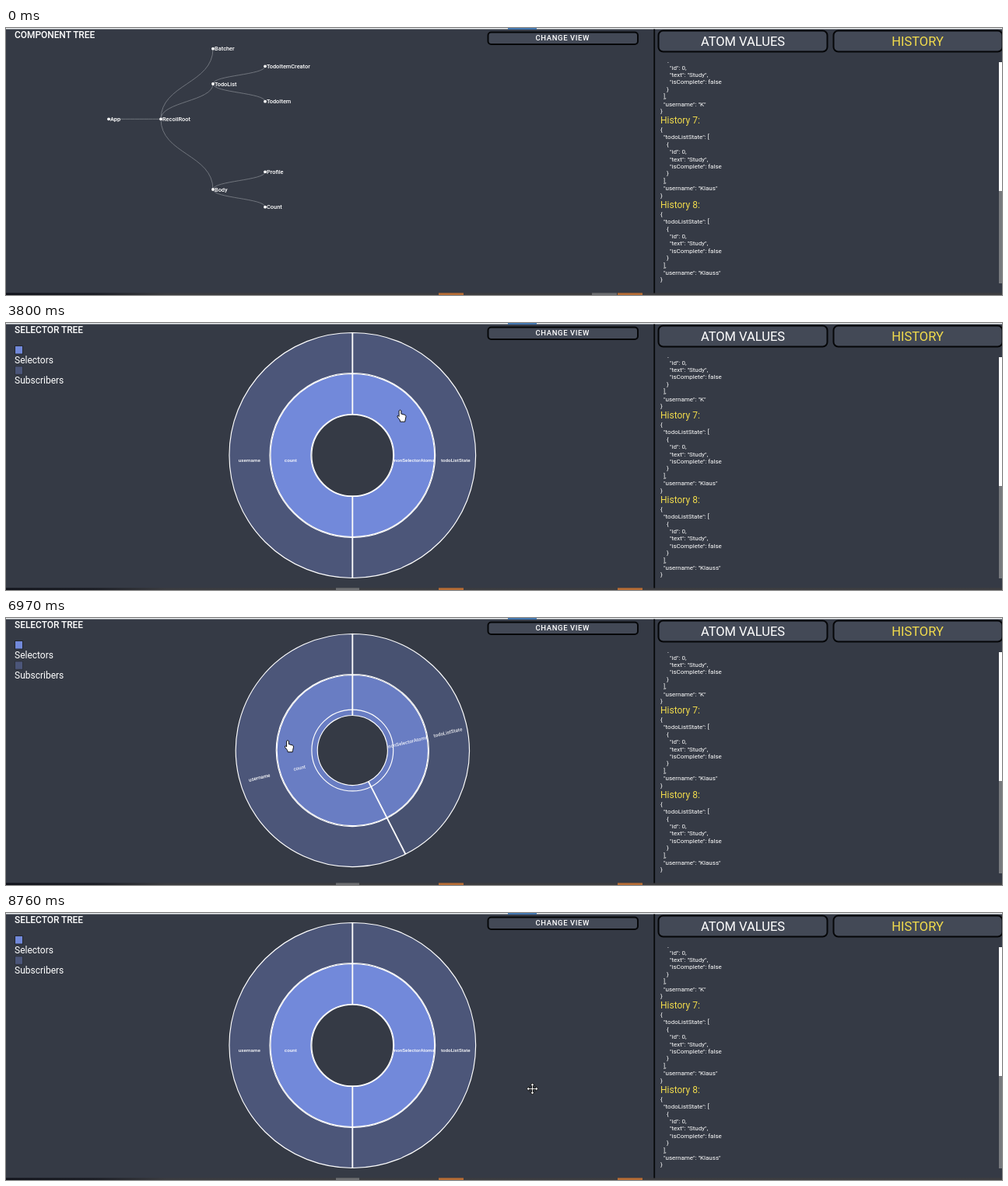
These frames come from a looping animation (1280 by 344 pixels, 8.81 s). An HTML page:

```html
<!DOCTYPE html>
<html lang="en">
<head>
<meta charset="utf-8">
<title>State inspector</title>
<style>
html, body { margin: 0; width: 100%; height: 100%; overflow: hidden; background: #353a45; }
svg { display: block; font-family: Roboto, sans-serif; fill: #fff; }
.title { font-size: 11.9px; font-weight: 500; }
.legend { font-size: 12px; }
.tab { font-size: 16.5px; text-anchor: middle; }
.view { font-size: 9.5px; font-weight: 500; letter-spacing: .6px; text-anchor: middle; }
.code { font-size: 8px; white-space: pre; }
.head { font-size: 12px; }
.yellow { fill: #f2dc4c; }
.box { fill: #434956; stroke: #050608; stroke-width: 2; }
.node { font-size: 7.4px; font-weight: 500; }
.link { fill: none; stroke: #777b83; stroke-width: .9; }
.arc { stroke: #fff; stroke-width: 1.15; }
.label { font-size: 6.25px; font-weight: 500; text-anchor: middle; }
.cursor { fill: #fff; stroke: #000; stroke-width: .9; stroke-linejoin: round; }
</style>
</head>
<body>
<svg id="stage" width="1280" height="344" viewBox="0 0 1280 344">
  <defs>
    <linearGradient id="bar">
      <stop offset="0" stop-color="#11131b"/>
      <stop offset=".09" stop-color="#1b1d24"/>
      <stop offset=".16" stop-color="#3a3b3f"/>
      <stop offset="1" stop-color="#3d3d40"/>
    </linearGradient>
    <clipPath id="list"><rect x="835" y="44" width="440" height="297"/></clipPath>
  </defs>
  <rect width="1280" height="344" fill="#353a45"/>
  <rect width="1280" height="1.5" fill="#eef0f2"/>
  <rect x="645" width="37" height="2" fill="#4377b0"/>
  <rect y="341.3" width="1280" height="2.7" fill="url(#bar)"/>
  <g fill="#b66c35">
    <rect x="556" y="341.3" width="32" height="2.7"/>
    <rect x="786" y="341.3" width="32" height="2.7"/>
  </g>
  <rect id="task" y="341.3" height="2.7" fill="#6c6d70"/>

  <rect x="832.3" y="1.5" width="1.8" height="340" fill="#08090b"/>
  <rect class="box" x="619.5" y="5.5" width="192.5" height="15.5" rx="4"/>
  <text class="view" x="715.3" y="16.3">CHANGE VIEW</text>
  <rect class="box" x="838.5" y="3.5" width="217" height="27" rx="6"/>
  <text class="tab" x="947" y="23">ATOM VALUES</text>
  <rect class="box" x="1063.5" y="3.5" width="217" height="27" rx="6"/>
  <text class="tab yellow" x="1171.5" y="23">HISTORY</text>
  <rect x="1276" y="44" width="4" height="166" fill="#fff"/>
  <rect x="1276" y="210" width="4" height="119" fill="#77797d"/>
  <g id="history" clip-path="url(#list)"></g>

  <g id="tree"><text class="title" x="11" y="13">COMPONENT TREE</text></g>
  <g id="selectors">
    <text class="title" x="11" y="13">SELECTOR TREE</text>
    <rect x="11.5" y="29.5" width="10" height="10.5" fill="#7289da" stroke="#23262e"/>
    <text class="legend" x="11" y="51.5">Selectors</text>
    <rect x="11.5" y="55.8" width="10" height="10.5" fill="#4c5679" stroke="#2d313b"/>
    <text class="legend" x="11" y="77.7">Subscribers</text>
    <g id="sun" transform="translate(445.3 170.5)"></g>
  </g>

  <circle id="click" r="8" fill="#ffff00" fill-opacity=".45"/>
  <g id="cursor" class="cursor">
    <path id="arrow" d="M0 0V15L3.5 11.8L5.8 17L8 16L5.8 11H10.5Z"/>
    <path id="move" d="M0-7.5L2.9-4.3H.9V-.9H4.3V-2.9L7.5 0L4.3 2.9V.9H.9V4.3H2.9L0 7.5L-2.9 4.3H-.9V.9H-4.3V2.9L-7.5 0L-4.3-2.9V-.9H-.9V-4.3H-2.9Z"/>
    <path id="hand" d="M-1.4 1Q0-.7 1.4 1V5L6.2 6.4Q7.7 6.9 7.5 8.7L6.6 13L6.2 15.2H.2L-.3 13L-3.5 9Q-3.9 7.3-2.5 7.4L-1.4 8.5Z"/>
  </g>
</svg>
<script>
const LOOP = 8810, SWITCH = 1250, R = 53, ZOOM = 750;
const $ = id => document.getElementById(id);
const lerp = (a, b, f) => a + (b - a) * f;
const clamp = v => Math.max(0, Math.min(1, v));

function add(parent, tag, attrs, text) {
  const el = document.createElementNS('http://www.w3.org/2000/svg', tag);
  for (const k in attrs) el.setAttribute(k, attrs[k]);
  if (text) el.textContent = text;
  return parent.appendChild(el);
}

// History list
['K', 'Klaus', 'Klauss'].forEach((username, i) => {
  const top = 25.4 + 108.7 * i;
  const state = { todoListState: [{ id: 0, text: 'Study', isComplete: false }], username };
  add($('history'), 'text', { class: 'head yellow', x: 841, y: top - 10.9 }, `History ${6 + i}:`);
  JSON.stringify(state, null, 2).split('\n').forEach((line, k) =>
    add($('history'), 'text', { class: 'code', x: 841, y: top + 9.39 * k }, line));
});

// Component tree: name, x, y, parent index
const parts = [
  ['App', 132, 117.3], ['RecoilRoot', 199, 117.3, 0], ['Batcher', 266, 26.7, 1],
  ['TodoList', 266, 72, 1], ['Body', 266, 208, 1], ['TodoItemCreator', 333, 49.3, 3],
  ['TodoItem', 333, 94.7, 3], ['Profile', 333, 185.3, 4], ['Count', 333, 230.7, 4]
];
for (const [, x, y, p] of parts) {
  if (p === undefined) continue;
  const [, px, py] = parts[p], mid = (y + py) / 2;
  add($('tree'), 'path', { class: 'link', d: `M${px} ${py}C${px} ${mid} ${x} ${mid} ${x} ${y}` });
}
for (const [name, x, y] of parts) {
  add($('tree'), 'circle', { cx: x, cy: y, r: 1.9 });
  add($('tree'), 'text', { class: 'node', x: x + 2, y: y + 2.5 }, name);
}

// Sunburst: side 0 is the right half, side 1 the left half
const slices = [['nonSelectorAtoms', 0, 1], ['count', 1, 1], ['todoListState', 0, 2], ['username', 1, 2]]
  .map(([name, side, depth]) => ({ name, side, depth }));
for (const s of slices)
  s.path = add($('sun'), 'path', { class: 'arc', fill: s.depth === 1 ? '#7289da' : '#4c5679' });
add($('sun'), 'circle', { class: 'arc', r: R - .6, fill: 'none' });
for (const s of slices) s.label = add($('sun'), 'text', { class: 'label', y: 8.3 }, s.name);

const at = (r, a) => `${(r * Math.sin(a)).toFixed(2)} ${(-r * Math.cos(a)).toFixed(2)}`;

function ring(r) {
  return r < .01 ? '' : `M0 ${-r}A${r} ${r} 0 1 1 0 ${r}A${r} ${r} 0 1 1 0 ${-r}Z`;
}

function sector(x0, x1, r0, r1) {
  if (x1 - x0 > .99999) return ring(r1) + ring(r0);
  const a0 = x0 * 2 * Math.PI, a1 = x1 * 2 * Math.PI;
  const gap = r => r > 1 ? Math.min(.35 / r, (a1 - a0) / 2) : 0;
  const big = x1 - x0 > .5 ? 1 : 0, g0 = gap(r0), g1 = gap(r1);
  return `M${at(r1, a0 + g1)}A${r1} ${r1} 0 ${big} 1 ${at(r1, a1 - g1)}` +
    `L${at(r0, a1 - g0)}A${r0} ${r0} 0 ${big} 0 ${at(r0, a0 + g0)}Z`;
}

function drawSun(f, open) {
  for (const s of slices) {
    const edge = x => lerp(x, clamp(x * 2 - open), f);
    const x0 = edge(s.side / 2), x1 = edge((s.side + 1) / 2);
    const y = s.depth - f, stays = s.depth === 2 && s.side === open;
    const turn = (x0 + x1) * 180;
    s.path.setAttribute('d', sector(x0, x1, y * R, (y + 1) * R - 1));
    s.path.setAttribute('fill-opacity', stays ? 1 : 1 - f);
    s.path.setAttribute('fill-rule', 'evenodd');
    s.label.setAttribute('fill-opacity', stays ? 1 : 1 - f);
    s.label.setAttribute('transform',
      `rotate(${turn - 90}) translate(${(y + .5) * R} 0) rotate(${turn < 180 ? 0 : 180})`);
  }
}

function ease(t, start) {
  const u = clamp((t - start) / ZOOM);
  return u < .5 ? 4 * u ** 3 : 1 - 4 * (1 - u) ** 3;
}

// Pointer: time, x, y, shape from that time on
const moves = [
  [130, 1131, 312, 'arrow'], [600, 860, 110, 'arrow'], [700, 815, 75, 'move'], [980, 722, 33, 'move'],
  [1080, 716, 15, 'hand'], [1300, 716, 15, 'hand'], [1400, 690, 26, 'move'], [1910, 335, 81, 'move'],
  [2100, 288.5, 93.5, 'move'], [2300, 245, 108, 'move'], [2480, 310, 128, 'move'], [2770, 484, 140, 'move'],
  [2930, 484, 140, 'move'], [3100, 454, 158, 'move'], [3220, 454, 158, 'move'],
  [3340, 494, 123, 'hand'], [3390, 506.5, 112, 'hand'], [3900, 506.5, 112, 'hand'],
  [4050, 570, 125, 'move'], [4250, 630, 138, 'move'], [4400, 610, 142, 'move'], [4700, 458, 147, 'move'],
  [4900, 458, 147, 'move'], [5060, 451, 162, 'move'], [5850, 451, 162, 'move'],
  [5960, 390, 156, 'hand'], [6150, 339, 148, 'hand'], [6260, 339, 148, 'hand'], [6480, 362, 157.5, 'hand'],
  [7440, 362, 157.5, 'hand'], [7510, 400, 162, 'move'], [7640, 470.5, 167.5, 'move'],
  [8150, 470.5, 167.5, 'move'], [8740, 676.5, 226.5, 'move'], [LOOP, 676.5, 226.5, 'move']
];
const clicks = [[1150, SWITCH], [3660, 3800], [5000, 5090], [6620, 6760], [7690, 7960]];

function drawCursor(t) {
  const shown = t >= moves[0][0];
  $('cursor').style.display = shown ? '' : 'none';
  const pressed = clicks.some(([from, to]) => t >= from && t < to);
  $('click').style.display = pressed ? '' : 'none';
  if (!shown) return;
  const i = moves.findIndex(m => m[0] > t);
  const [t0, x0, y0, shape] = moves[i - 1], [t1, x1, y1] = moves[i];
  const f = (t - t0) / (t1 - t0);
  const place = `translate(${lerp(x0, x1, f)} ${lerp(y0, y1, f)})`;
  $('cursor').setAttribute('transform', place);
  $('click').setAttribute('transform', place);
  for (const id of ['arrow', 'move', 'hand']) $(id).style.display = id === shape ? '' : 'none';
}

function frame() {
  const t = performance.now() % LOOP, second = t >= SWITCH;
  $('tree').style.display = second ? 'none' : '';
  $('selectors').style.display = second ? '' : 'none';
  $('task').setAttribute('x', second ? 424 : 753);
  $('task').setAttribute('width', second ? 30 : 32);
  const open = t < 6300 ? 0 : 1;
  drawSun(open ? ease(t, 6720) - ease(t, 7940) : ease(t, 3790) - ease(t, 5090), open);
  drawCursor(t);
  requestAnimationFrame(frame);
}
frame();
</script>
</body>
</html>
```
